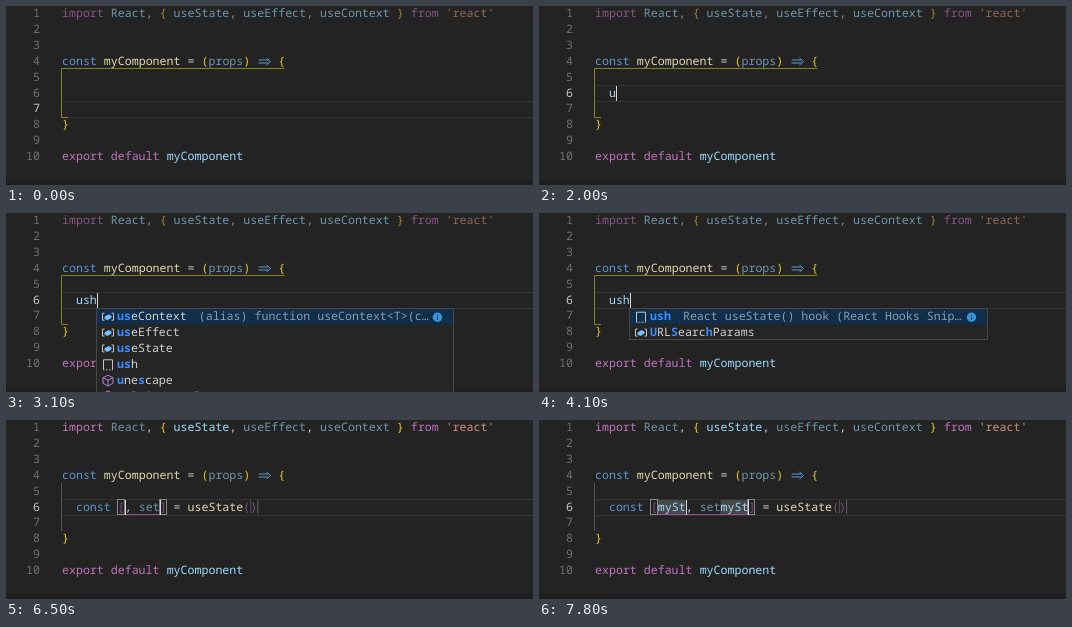
An HTML page for the animation above (8000 ms loop, 527x179 px).

```html
<!DOCTYPE html>
<html lang="en">
<head>
<meta charset="utf-8">
<title>Code editor</title>
<style>
  html, body { margin: 0; width: 527px; height: 179px; overflow: hidden; background: #232323; }
  svg { display: block; }
  text {
    font: 11.625px "Noto Sans Mono", "DejaVu Sans Mono", monospace;
    white-space: pre;
    text-rendering: geometricPrecision;
  }
</style>
</head>
<body>
<svg id="stage" width="527" height="179" viewBox="0 0 527 179"></svg>
<script>
const LOOP = 8000, LEFT = 56, CHAR = 6.975, ROW = 15.86;
const C = {
  plain: '#d0d0d0', keyword: '#5b98d0', flow: '#c173bd', name: '#9cdcfe', fn: '#dcdcaa',
  string: '#ce9178', gold: '#e8cb2a', pink: '#c565c1', match: '#3a8cff'
};
const stage = document.getElementById('stage');

const colX = col => LEFT + col * CHAR;
const baseline = line => 11.3 + (line - 1) * ROW;
const rowTop = line => 79 + (line - 6) * 16;
const escapeText = s => s.replace(/&/g, '&amp;').replace(/</g, '&lt;');

const rect = (x, y, w, h, fill, extra = '') =>
  `<rect x="${x}" y="${y}" width="${w}" height="${h}" fill="${fill}" ${extra}/>`;
const box = (x, y, w, h, stroke) =>
  rect(x + .5, y + .5, w - 1, h - 1, 'none', `stroke="${stroke}"`);
const label = (x, y, s, fill, extra = '') =>
  `<text x="${x}" y="${y}" fill="${fill}" ${extra}>${escapeText(s)}</text>`;

// Tokens are [text, colour, dimmed].
function codeLine(line, col, tokens) {
  let out = '';
  for (const [s, fill, dim] of tokens) {
    out += label(colX(col), baseline(line), s, fill, dim ? 'opacity=".62"' : '');
    col += s.length;
  }
  return out;
}

function staticCode(t) {
  const unused = t < 5900;
  const arrow = `<path d="M252.5 54h10M252.5 57h10M260.5 52l4 3.5l-4 3.5" fill="none" stroke="${C.keyword}"/>`;
  return codeLine(1, 0, [
    ['import ', C.flow, unused], ['React', C.name, true], [', ', C.plain, unused],
    ['{ ', C.gold, unused], ['useState', C.name, unused], [', ', C.plain, unused],
    ['useEffect', C.name, true], [', ', C.plain, unused], ['useContext', C.name, true],
    [' }', C.gold, unused], [' from ', C.flow, unused], ["'react'", C.string, unused]
  ]) + codeLine(4, 0, [
    ['const ', C.keyword], ['myComponent', C.fn], [' = ', C.plain], ['(', C.gold],
    ['props', C.name, true], [')', C.gold], ['    {', C.gold]
  ]) + arrow + codeLine(8, 0, [['}', C.gold]])
    + codeLine(10, 0, [['export default ', C.flow], ['myComponent', C.name]]);
}

function gutter(active) {
  let out = '';
  for (let n = 1; n <= 10; n++)
    out += label(34, baseline(n), String(n), n === active ? '#c8c8c8' : '#707070', 'text-anchor="end"');
  return out;
}

function scope(t) {
  if (t >= 6100) return rect(55, 63, 1, 48, '#555');
  return '<path d="M278.5 62.5H55.5V111.5H62" fill="none" stroke="#858021"/>';
}

const cursor = (line, col) => rect(Math.round(colX(col)), rowTop(line) + 1, 1, 15, '#d8d8d8');

function icon(kind, x, y) {
  if (kind === 'snippet')
    return `<path d="M${x + 1.5} ${y + 5}v-9.5h9v9.5" fill="none" stroke="#c5c5c5"/>` +
      `<path d="M${x + 1} ${y + 5.5}h10" stroke="#c5c5c5" stroke-dasharray="1.5 1.5"/>`;
  if (kind === 'method')
    return `<path d="M${x + 6} ${y - 5}l5 2.5v5.5l-5 3l-5-3v-5.5zM${x + 1} ${y - 2.5}l5 2.5l5-2.5M${x + 6} ${y}v6" fill="none" stroke="#b180d7"/>`;
  return `<path d="M${x + 2.5} ${y - 3.5}h-2v7h2M${x + 9.5} ${y - 3.5}h2v7h-2" fill="none" stroke="#c5c5c5"/>` +
    `<path d="M${x + 2.5} ${y}l4-2.5l3 1.5v2l-4 2.5l-3-1.5z" fill="#75beff"/>`;
}

// Matched characters are bold and blue; the rest stay plain.
function matchedLabel(x, y, s, query) {
  let q = 0, out = '';
  [...s].forEach((ch, i) => {
    const hit = q < query.length && ch.toLowerCase() === query[q];
    if (hit) q++;
    out += label(x + i * CHAR, y, ch, hit ? C.match : C.plain, hit ? 'font-weight="700" style="font-weight:700"' : '');
  });
  return out;
}

const WIDE = [
  ['useContext', 'variable'], ['useEffect', 'variable'], ['useState', 'variable'],
  ['ush', 'snippet'], ['unescape', 'method'], ['unPtSegmentP', 'method']
];
const NARROW = [['ush', 'snippet'], ['URLSearchParams', 'variable']];

function popup(x, items, query, detail, width) {
  const height = items.length > 2 ? 100 : 32;
  let out = rect(x, 95, width, height, '#252526') +
    rect(x + 1, 96, width - 2, 15.5, '#102d49') + box(x, 95, width, height, '#484848');
  items.forEach(([name, kind], i) => {
    const y = 103.7 + i * ROW;
    out += icon(kind, x + 6, y) + matchedLabel(x + 21, y + 3.6, name, query);
  });
  if (detail) {
    const dx = x + 21 + items[0][0].length * CHAR + 12;
    out += label(dx, 107.3, detail, '#8d9dac') +
      `<circle cx="${x + width - 16.5}" cy="104.3" r="4.7" fill="#3794d8"/>` +
      rect(x + width - 17, 103.5, 1, 3.5, '#102d49') + rect(x + width - 17, 101.5, 1, 1, '#102d49');
  }
  return out;
}

function suggestions(t) {
  if (t < 2100 || t >= 5500) return '';
  if (t >= 3300) return popup(90, NARROW, 'ush', 'React useState() hook (React Hooks Snip…', 359);
  const detail = t >= 2200 ? '(alias) function useContext<T>(c…' : '';
  const x = t < 2500 ? 77 : t < 3100 ? 84 : 90;
  return popup(x, WIDE, t < 2500 ? 'u' : 'us', detail, 358);
}

function hookLine(t) {
  const typed = 'mySt'.slice(0, [6800, 7000, 7500, 7800].filter(at => t >= at).length);
  const n = typed.length, first = 9, second = 14 + n, close = second + n, call = close + 4;
  const colored = t >= 5700, paired = t >= 6100;
  const pick = color => colored ? color : C.plain;
  const bracket = pick(paired ? C.pink : C.gold);
  let out = '';

  if (n) for (const col of [first, second])
    out += rect(colX(col), 80, n * CHAR, 14, '#474747');
  out += rect(colX(call + 9), 80, 1, 14, '#555') + rect(colX(call + 10), 80, 1, 14, '#606060');
  if (paired) {
    out += rect(colX(8), 94, (close - 7) * CHAR, 1, '#94508f');
    for (const col of [8, close]) out += box(Math.round(colX(col)) - 1, 79, 8, 16, '#888');
  }
  out += codeLine(6, 2, [
    ['const ', pick(C.keyword)], ['[', bracket, paired], [typed, C.name],
    [', ', C.plain], ['set', pick(C.name), t >= 5900], [typed, C.name],
    [']', bracket, paired], [' = ', C.plain], ['useState', pick(C.fn)],
    ['()', bracket, paired]
  ]);
  if (t < 6000 || t >= 6500) out += cursor(6, first + n) + cursor(6, close);
  return out;
}

function editLine(t) {
  if (t >= 5500) return hookLine(t);
  if (t < 400) return t >= 200 ? cursor(7, 0) : '';
  if (t < 1900) return cursor(6, t < 700 || (t >= 1000 && t < 1100) ? 0 : 2);
  const typed = t < 2400 ? 'u' : t < 3100 ? 'us' : 'ush';
  const hidden = [[2900, 3100], [3600, 4100], [4600, 5100]].some(([a, b]) => t >= a && t < b);
  return codeLine(6, 2, [[typed, t < 2400 ? '#b9d3e0' : C.name]]) +
    (hidden ? '' : cursor(6, 2 + typed.length));
}

function render(t) {
  const active = t < 400 ? 7 : 6, top = rowTop(active);
  stage.innerHTML = rect(0, 0, 527, 179, '#232323') + rect(0, 174, 527, 5, '#1f1f1f') +
    rect(56, top, 471, 1, '#333') + rect(56, top + 16, 471, 1, '#333') +
    gutter(active) + scope(t) + staticCode(t) + editLine(t) + suggestions(t);
}

const start = performance.now();
let shown = -1;
function tick() {
  const t = (performance.now() - start) % LOOP;
  const step = Math.floor(t / 100);
  if (step !== shown) render((shown = step) * 100);
  requestAnimationFrame(tick);
}
tick();
</script>
</body>
</html>
```
